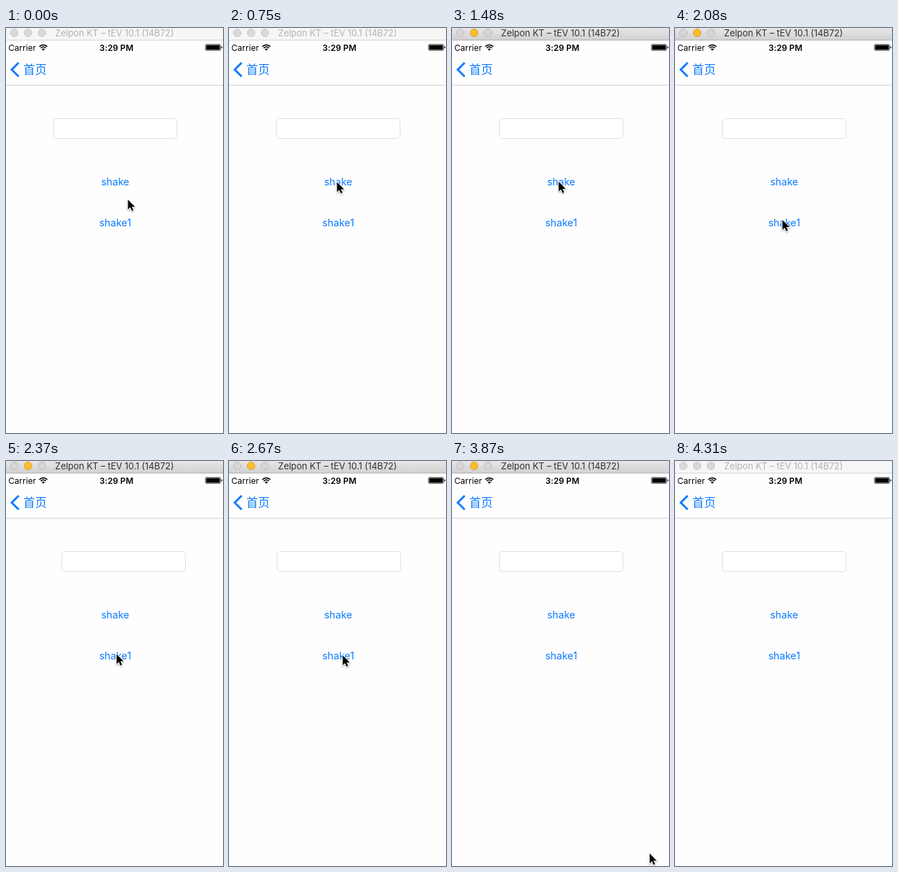
These frames come from a looping animation (314x584 px, 4.41 s). An HTML page:

```html
<!DOCTYPE html>
<html lang="zh">
<head>
<meta charset="utf-8">
<title>Shake</title>
<style>
  html, body { margin: 0; width: 100%; height: 100%; overflow: hidden; background: #fefefe; }
  svg { display: block; width: 314px; height: 584px; }
  text { font-family: Inter, "Noto Sans CJK SC", "Noto Sans CJK", sans-serif; }
  .mid { text-anchor: middle; }
  .link { font-size: 14.6px; fill: #0b7aff; }
  .status { font-size: 12px; fill: #000; }
</style>
</head>
<body>
<svg viewBox="0 0 314 584" xmlns="http://www.w3.org/2000/svg">
  <defs>
    <linearGradient id="chrome" x1="0" y1="0" x2="0" y2="1">
      <stop offset="0" stop-color="#e7e7e7"/>
      <stop offset="1" stop-color="#d1d1d1"/>
    </linearGradient>
    <filter id="soft" x="-50%" y="-50%" width="200%" height="200%">
      <feGaussianBlur stdDeviation="0.8"/>
    </filter>
    <path id="arrow" d="M0 0V14.2L3.3 11.1L5.6 16.3L7.9 15.3L5.6 10.3H10.2Z"/>
  </defs>

  <rect width="314" height="584" fill="#fefefe"/>

  <!-- Window title bar -->
  <rect id="bar" width="314" height="17"/>
  <rect id="edge" y="17" width="314" height="1"/>
  <g id="lights" stroke-width="1">
    <circle cx="12" cy="7" r="5.5"/>
    <circle cx="32" cy="7" r="5.5"/>
    <circle cx="52" cy="7" r="5.5"/>
  </g>
  <text id="title" class="mid" x="157" y="12" font-size="12.9">Zelpon KT – tEV 10.1 (14B72)</text>

  <!-- Status bar -->
  <text class="status" x="3.4" y="32.5" letter-spacing="0.1">Carrier</text>
  <g fill="none" stroke="#000" stroke-width="1.7">
    <path d="M48.3 26.8A8.1 8.1 0 0 1 59.7 26.8"/>
    <path d="M50.3 28.8A5.2 5.2 0 0 1 57.7 28.8"/>
  </g>
  <path d="M54 32.8L51.8 30.5A3.1 3.1 0 0 1 56.2 30.5Z"/>
  <text class="status mid" x="159.8" y="32.5" font-weight="600" letter-spacing="0.1">3:29 PM</text>
  <rect x="288.5" y="23.5" width="22" height="9" rx="1.5" fill="#fff" stroke="#777"/>
  <rect x="289.5" y="24.5" width="20" height="7" rx="0.6"/>
  <path d="M311.5 26.3Q313 26.6 313 28T311.5 29.7Z"/>

  <!-- Navigation bar -->
  <path d="M18.3 50L8.3 60L18.3 70" fill="none" stroke="#0b7aff" stroke-width="3"/>
  <text x="25" y="66" font-size="17" fill="#0b7aff">首页</text>
  <rect y="82" width="314" height="1" fill="#d2d2d2"/>

  <rect id="field" x="68.5" y="130.5" width="179" height="29" rx="4.5" fill="#fff" stroke="#e0e0e0"/>
  <text class="link mid" x="158" y="227">shake</text>
  <text class="link mid" x="158" y="286">shake1</text>

  <g id="cursor">
    <use href="#arrow" y="1.2" fill="#000" stroke="#000" stroke-width="1.6" opacity="0.35" filter="url(#soft)"/>
    <use href="#arrow" fill="#000" stroke="#fff" stroke-width="1.8" paint-order="stroke"/>
  </g>
</svg>
<script>
  const LOOP = 4410, STEP = 148.6, LEAD = 10;
  const $ = id => document.getElementById(id);
  const [bar, edge, title, field, cursor] = ["bar", "edge", "title", "field", "cursor"].map($);
  const lights = [...$("lights").children];

  // Where the pointer rests or turns: step, x, y
  const stops = [
    [0, 176.5, 247.5], [2, 173.5, 248], [5, 156.3, 222.3], [10, 154.4, 221.6],
    [14, 155.5, 276.8], [18, 164.6, 280.3], [22, 252.7, 486.5], [26, 286, 566], [27, 330, 600]
  ];

  const ease = u => u * u * (3 - 2 * u);

  function pointer(n) {
    const i = stops.findIndex(s => s[0] > n);
    if (i < 0) return stops.at(-1).slice(1);
    const [from, to] = [stops[i - 1], stops[i]];
    const u = ease((n - from[0]) / (to[0] - from[0]));
    return [1, 2].map(k => from[k] + (to[k] - from[k]) * u);
  }

  // Fading push, in whole pixels
  const shake = (n, size, decay) => n < 0 ? 0 : Math.trunc(size * decay ** n);

  function paint(el, fill, stroke) {
    el.setAttribute("fill", fill);
    if (stroke) el.setAttribute("stroke", stroke);
  }

  function move(el, x, y) {
    el.setAttribute("transform", `translate(${x} ${y})`);
  }

  function draw(t) {
    const n = Math.floor((t + LEAD) / STEP);
    const active = n >= 6 && n < 29;
    paint(bar, active ? "url(#chrome)" : "#f6f6f6");
    paint(edge, active ? "#b4b4b4" : "#d4d4d4");
    paint(title, active ? "#303030" : "#b2b2b2");
    lights.forEach((el, i) => {
      if (active && i === 1) paint(el, "#fdbd2f", "#e0a02a");
      else paint(el, active ? "#d6d6d6" : "#d9d9d9", active ? "#bcbcbc" : "#cccccc");
    });
    move(field, shake(n - 7, -8, 0.4) + shake(n - 16, 12, -0.4), 0);
    move(cursor, ...pointer(n));
  }

  function tick() {
    draw(performance.now() % LOOP);
    requestAnimationFrame(tick);
  }
  tick();
</script>
</body>
</html>
```
